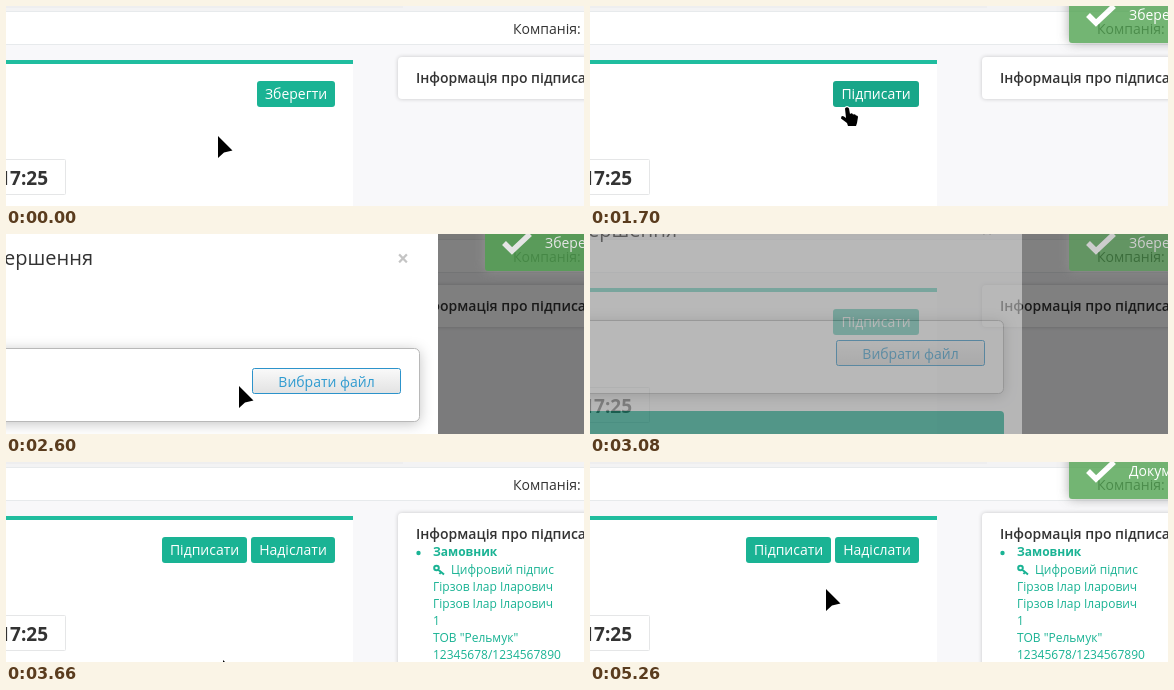
Animation of 578x200 px, one loop 5.38 s. Source, as an HTML page with a canvas:

```html
<!DOCTYPE html>
<html lang="uk">
<head>
<meta charset="utf-8">
<style>
html, body { margin: 0; width: 578px; height: 200px; overflow: hidden; }
canvas { display: block; }
</style>
</head>
<body>
<canvas id="stage" width="578" height="200"></canvas>
<script>
const LOOP = 5380;
const TEAL = '#1ab394';
const INK = '#333';

const stage = document.getElementById('stage');
const sheet = document.createElement('canvas');
sheet.width = stage.width;
sheet.height = stage.height;
const main = stage.getContext('2d');
const overlay = sheet.getContext('2d');
let ctx = main;

const ramp = (t, from, to) => Math.min(1, Math.max(0, (t - from) / (to - from)));
const easeOut = p => 1 - (1 - p) ** 3;
const easeInOut = p => p * p * (3 - 2 * p);

function rect(x, y, w, h, color) {
  ctx.fillStyle = color;
  ctx.fillRect(x, y, w, h);
}

function box(x, y, w, h, r, fill, stroke) {
  ctx.beginPath();
  ctx.roundRect(x, y, w, h, r);
  ctx.fillStyle = fill;
  ctx.fill();
  if (stroke) {
    ctx.shadowColor = 'transparent';
    ctx.strokeStyle = stroke;
    ctx.lineWidth = 1;
    ctx.stroke();
  }
}

function text(str, x, y, size, color, weight = 400, align = 'left') {
  ctx.font = `${weight} ${size}px "Open Sans", sans-serif`;
  ctx.textAlign = align;
  ctx.fillStyle = color;
  ctx.fillText(str, x, y);
}

function dot(x, y, r, color) {
  ctx.beginPath();
  ctx.arc(x, y, r, 0, 7);
  ctx.fillStyle = color;
  ctx.fill();
}

function isolated(draw) {
  ctx.save();
  draw();
  ctx.restore();
}

// Shadows only the shapes painted inside draw
function shadowed(color, blur, dy, draw) {
  isolated(() => {
    ctx.shadowColor = color;
    ctx.shadowBlur = blur;
    ctx.shadowOffsetY = dy;
    draw();
  });
}

// Paints onto a separate sheet and blends it as one piece
function group(alpha, draw) {
  if (alpha <= 0) return;
  ctx = overlay;
  ctx.clearRect(0, 0, 578, 200);
  isolated(draw);
  ctx = main;
  isolated(() => {
    ctx.globalAlpha = alpha;
    ctx.drawImage(sheet, 0, 0);
  });
}

function button(label, x, w, busy = false, hover = false) {
  isolated(() => {
    ctx.globalAlpha = busy ? 0.65 : 1;
    box(x, 75, w, 26, 3, hover ? '#18a689' : TEAL);
  });
  text(label, x + w / 2, 93, 14, '#fff', 400, 'center');
}

function drawHeader() {
  rect(0, 0, 578, 200, '#f8f8fa');
  rect(0, 0, 578, 6, '#f3f3f4');
  rect(0, 0, 397, 2, '#eeeeef');
  rect(0, 5, 578, 1, '#e7eaec');
  rect(0, 6, 578, 32, '#fff');
  rect(0, 38, 578, 1, '#e7eaec');
  text('Компанія:', 507, 28, 14, INK);
}

function drawCard(t, hover) {
  const saving = t >= 580 && t < 1100;
  const signing = t >= 3180 && t < 3640;
  rect(0, 54, 347, 146, '#fff');
  rect(0, 54, 347, 4, '#20bd9f');
  box(-80.5, 153.5, 140, 35, 1, saving || signing ? '#f2f2f2' : '#fff', '#e5e6e7');
  text('17:25', 42, 179, 19, INK, 700, 'right');
  if (t < 1100) {
    button('Зберегти', 251, 78, saving, hover);
  } else if (t < 3640) {
    button('Підписати', 243, 86, signing, hover);
  } else {
    button('Підписати', 156, 85);
    button('Надіслати', 245, 84);
  }
}

function drawKey() {
  ctx.strokeStyle = TEAL;
  ctx.lineWidth = 2;
  ctx.beginPath();
  ctx.arc(430.5, 106, 2.3, 0, 7);
  ctx.moveTo(432, 107.5);
  ctx.lineTo(438, 112.5);
  ctx.moveTo(435, 110);
  ctx.lineTo(433.5, 112);
  ctx.stroke();
}

function drawInfo(open) {
  shadowed('rgba(0,0,0,.2)', 4, 0, () => box(392, 51, 220, open ? 170 : 42, 4, '#fff'));
  text('Інформація про підписання', 410, 77, 14, INK, 600);
  if (!open) return;
  dot(412.5, 91, 2.2, TEAL);
  text('Замовник', 427, 94, 12, TEAL, 700);
  drawKey();
  text('Цифровий підпис', 445, 112, 12, TEAL);
  const signer = 'Гірзов Ілар Іларович';
  [signer, signer, '1', 'ТОВ "Рельмук"', '12345678/1234567890']
    .forEach((line, i) => text(line, 427, 129 + 17 * i, 12, TEAL));
}

function paintModal(dy) {
  rect(0, 0, 432, 200, '#fff');
  ctx.translate(0, dy);
  text('завершення', 87, 31, 20, INK, 500, 'right');
  text('×', 397, 32, 21, '#c4c4c4', 700, 'center');
  shadowed('rgba(0,0,0,.25)', 14, 2, () => box(-20.5, 114.5, 434, 73, 5, '#fff', '#b8b8b8'));
  const face = ctx.createLinearGradient(0, 134, 0, 160);
  face.addColorStop(0, '#fafafa');
  face.addColorStop(1, '#e2e2e2');
  box(246.5, 134.5, 148, 25, 2, face, '#2c93cb');
  text('Вибрати файл', 320.5, 153, 14, '#2f9bd0', 400, 'center');
  box(-20, 205, 434, 120, 4, TEAL);
  ['Зверніть увагу! Ключ для підписання, що',
    'використовується, знаходиться на незахищеному',
    'носії'].forEach((line, i) => text(line, 395, 237 + 13 * i, 12, '#f8ac59', 400, 'right'));
}

function drawModal(t) {
  const shade = ramp(t, 1860, 2000) - ramp(t, 3080, 3240);
  const alpha = ramp(t, 1960, 2080) - ramp(t, 2980, 3160);
  const dy = -150 * (1 - easeOut(ramp(t, 1960, 2260))) - 110 * ramp(t, 2980, 3180) ** 2;
  rect(0, 0, 578, 200, `rgba(0,0,0,${shade / 2})`);
  group(alpha, () => paintModal(Math.round(dy)));
}

function drawToast(label, alpha) {
  group(alpha * 0.8, () => {
    shadowed('#999', 12, 0, () => box(479, -30, 140, 67, 3, '#51a351'));
    ctx.strokeStyle = '#fff';
    ctx.lineWidth = 5.5;
    ctx.beginPath();
    ctx.moveTo(498, 9);
    ctx.lineTo(506, 17);
    ctx.lineTo(524, 0);
    ctx.stroke();
    text(label, 539, 14, 14, '#fff');
  });
}

// time, x, y
const PATH = [
  [0, 212, 130], [40, 212, 130], [500, 257, 101], [1720, 257, 101],
  [2000, 262, 90], [2240, 262, 90], [2580, 233, 152], [2640, 233, 152],
  [2780, 264, 150], [2980, 264, 150], [3560, 215, 205], [4100, 236, 127], [LOOP, 236, 127]
];

function cursorAt(t) {
  const i = PATH.findIndex(p => p[0] > t);
  const [t0, x0, y0] = PATH[i - 1];
  const [t1, x1, y1] = PATH[i];
  const p = easeInOut(ramp(t, t0, t1));
  return { x: Math.round(x0 + (x1 - x0) * p), y: Math.round(y0 + (y1 - y0) * p) };
}

const ARROW = new Path2D('M0 0 L0 22 L6 16.5 L14.5 14.5 Z');
const HAND = new Path2D('M-2 1.5 Q0 -1 2 1.5 L3 7 Q5 5.5 6 7.5 Q8 6.5 9 8.5 ' +
  'Q11 8 11 10 L10 16 L9 19 L1 19 L0 16 L-6 11.5 Q-6 8 -3 9.5 L-1 11 Z');

function drawCursor({ x, y }, shape) {
  isolated(() => {
    ctx.translate(x, y);
    ctx.lineJoin = 'round';
    ctx.lineWidth = 2.4;
    ctx.strokeStyle = '#fff';
    ctx.fillStyle = '#000';
    ctx.stroke(shape);
    ctx.fill(shape);
  });
}

function render(t) {
  const cursor = cursorAt(t);
  const saving = t >= 580 && t < 1100;
  const onAction = t < 1920 && !saving && cursor.x > 251 && cursor.y < 105;
  const onFile = t > 2640 && t < 2980 && cursor.x >= 246;
  drawHeader();
  drawCard(t, onAction);
  drawInfo(t >= 3640);
  drawModal(t);
  drawToast('Збережено', ramp(t, 1140, 1400) - ramp(t, 2980, 3400));
  drawToast('Документ', ramp(t, 3700, 3960));
  if (t < 2980 || t >= 3560) drawCursor(cursor, onAction || onFile ? HAND : ARROW);
}

const start = performance.now();

function tick() {
  render((performance.now() - start) % LOOP);
  requestAnimationFrame(tick);
}

tick();
</script>
</body>
</html>
```
